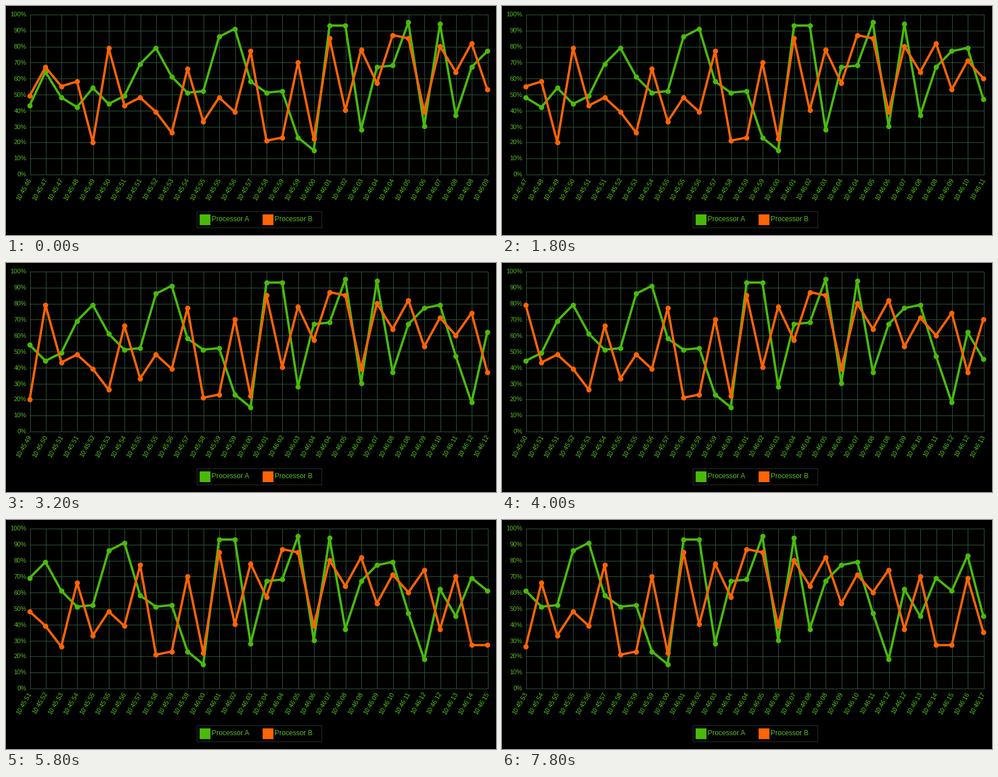
A matplotlib script that plays this animation: 848x398 px, repeating every 8000 ms.

```python
import matplotlib.pyplot as plt
import numpy as np
from matplotlib.animation import FuncAnimation
from matplotlib.patches import Rectangle

W, H, DPI = 848, 398, 100
PX = 72 / DPI  # points per pixel
STEP_MS, LOOP_MS = 100, 8000
VISIBLE = 30

GREEN, ORANGE = "#4aba0a", "#ff6404"
TEXT, GRID = "#55c41e", "#2f5637"
LEFT, RIGHT, TOP, BOTTOM = 41, 833, 14.5, 292.5

# Moments at which a new sample arrives and the window moves on by one
ARRIVALS = np.array([800, 1600, 2300, 3000, 3800, 4600, 5600, 6300, 7000])

LOAD_A = np.array([
    43, 64, 48, 42, 54, 44, 49, 69, 79, 61, 51, 52, 86, 91, 58, 51, 52, 23, 15, 93,
    93, 28, 67, 68, 95, 30, 94, 37, 67, 77, 79, 47, 18, 62, 45, 69, 61, 83, 45])
LOAD_B = np.array([
    49, 67, 55, 58, 20, 79, 43, 48, 39, 26, 66, 33, 48, 39, 77, 21, 23, 70, 22, 85,
    40, 78, 57, 87, 85, 39, 80, 64, 82, 53, 71, 60, 74, 37, 70, 27, 27, 69, 35])

plt.rcParams["font.family"] = "Liberation Sans"


def clock(i):
    """Time label of sample i; samples come a little faster than once a second."""
    sec = 46 + i - int((i + 4.2) / 5.28)
    return f"10:{45 + sec // 60}:{sec % 60:02d}"


def to_y(percent):
    return BOTTOM - (BOTTOM - TOP) * percent / 100


fig = plt.figure(figsize=(W / DPI, H / DPI), dpi=DPI, facecolor="black")
ax = fig.add_axes([0, 0, 1, 1])
ax.set_xlim(0, W)
ax.set_ylim(H, 0)
ax.axis("off")


def write(x, y, s, size, **kw):
    return ax.text(x, y, s, fontsize=size * PX, color=TEXT, **kw)


def box(x, y, w, h, fill, edge):
    ax.add_patch(Rectangle((x, y), w, h, facecolor=fill, edgecolor=edge, linewidth=PX))


xs = np.linspace(LEFT, RIGHT, VISIBLE)

# Grid and value axis
for x in np.floor(xs) + 0.5:
    ax.plot([x, x], [TOP, BOTTOM], color=GRID, lw=PX, zorder=1)
for p in range(0, 101, 10):
    y = np.floor(to_y(p)) + 0.5
    ax.plot([LEFT - 0.5, RIGHT + 0.5], [y, y], color=GRID, lw=PX, zorder=1)
    write(35.5, y, f"{p}%", 11, ha="right", va="center_baseline")

# Legend
box(329.5, 356.5, 216, 28, "black", "#26302a")
for x, color, edge, name in [(334.5, GREEN, "#3f9e09", "Processor A"),
                             (443.5, ORANGE, "#d95503", "Processor B")]:
    box(x, 361.5, 18, 18, color, edge)
    write(x + 21.5, 374.5, name, 12, va="baseline")

# Moving parts
series = []
for load, color in [(LOAD_A, GREEN), (LOAD_B, ORANGE)]:
    line, = ax.plot(xs, to_y(load[:VISIBLE]), color=color, lw=4 * PX, marker="o",
                    ms=9 * PX, mew=0, solid_joinstyle="round", zorder=3, clip_on=False)
    series.append((line, load))

labels = [write(x + 1.2, 300, "", 11, rotation=60, rotation_mode="anchor",
                ha="right", va="center") for x in xs]


def draw(frame):
    first = int(np.sum(ARRIVALS <= frame * STEP_MS))
    for line, load in series:
        line.set_ydata(to_y(load[first:first + VISIBLE]))
    for k, label in enumerate(labels):
        label.set_text(clock(first + k))
    return [line for line, _ in series] + labels


anim = FuncAnimation(fig, draw, frames=LOOP_MS // STEP_MS, interval=STEP_MS,
                     repeat=True, repeat_delay=0, blit=False)
plt.show()
```
